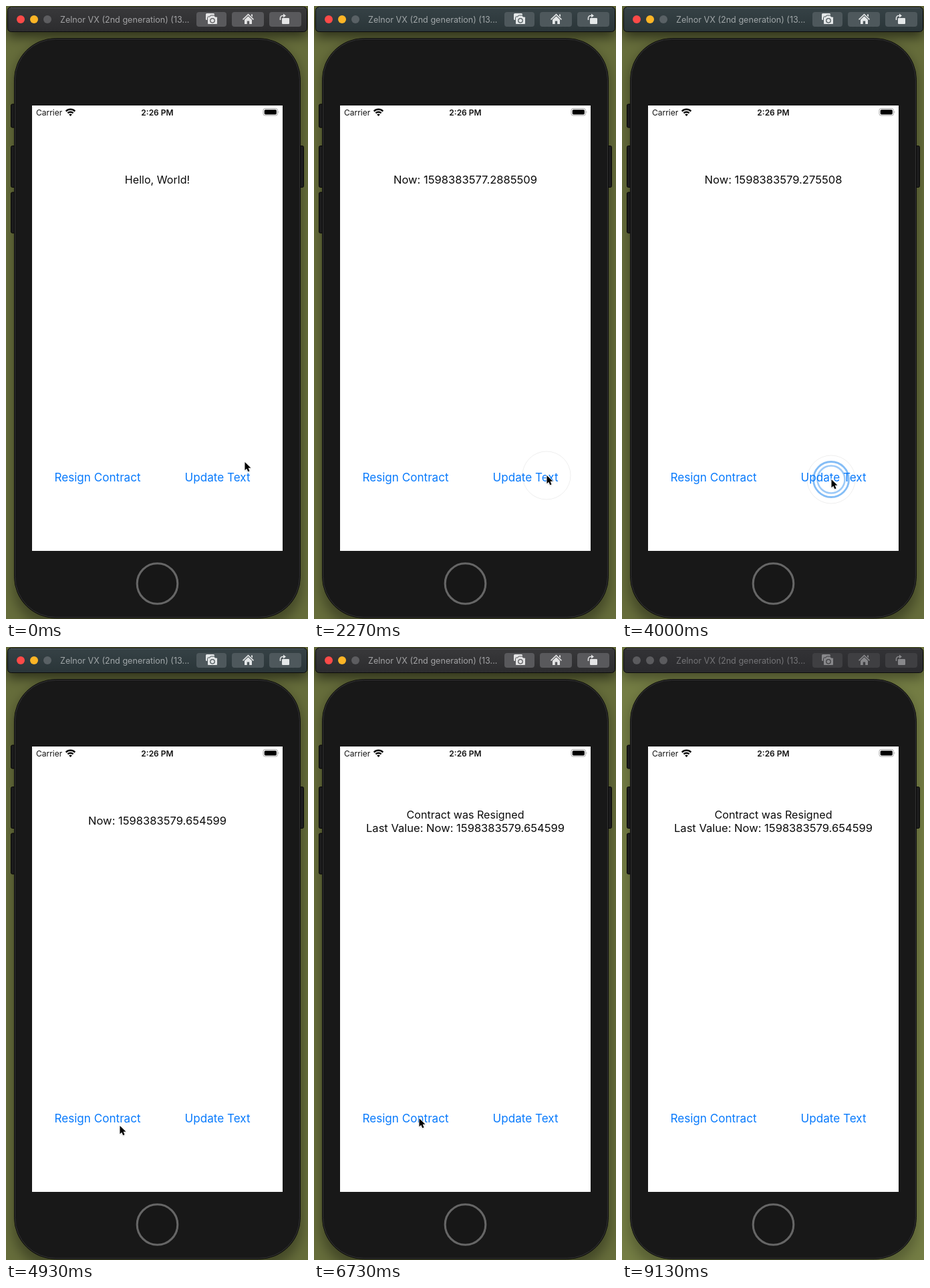
An HTML page for the animation above (9.54 s loop, 452 by 918 pixels).

```html
<!DOCTYPE html>
<html lang="en">
<head>
<meta charset="utf-8">
<title>Simulator demo</title>
<style>
  html, body { margin: 0; width: 100%; height: 100%; overflow: hidden; background: #62693a; }
  svg { display: block; width: 452px; height: 918px; }
  text { font-family: Inter, "Open Sans", sans-serif; }
  .mid { text-anchor: middle; }
  .label { font-size: 16.1px; fill: #0b0b0b; }
  .label.number { font-size: 16.55px; }
  .button { font-size: 17.1px; fill: #087afc; }
</style>
</head>
<body>
<svg viewBox="0 0 452 918" xmlns="http://www.w3.org/2000/svg">
  <defs>
    <linearGradient id="barFill" x2="0" y2="1">
      <stop id="barTop" offset="0"/><stop id="barBottom" offset="1"/>
    </linearGradient>
    <filter id="soft" x="-20%" y="-20%" width="140%" height="140%"><feGaussianBlur stdDeviation="9"/></filter>
    <filter id="small" x="-50%" y="-50%" width="200%" height="200%"><feGaussianBlur stdDeviation="1"/></filter>
  </defs>

  <rect id="desk" width="452" height="918"/>
  <g id="shadow" filter="url(#soft)">
    <rect x="2" y="8" width="449" height="38" rx="5"/>
    <rect x="11" y="56" width="431" height="874" rx="60" opacity=".6"/>
  </g>

  <!-- title bar -->
  <rect x="2.5" y="1.5" width="448" height="37" rx="5" fill="url(#barFill)" stroke="#0c0c0d"/>
  <path d="M7 2.5H446" stroke="#fff" opacity=".16"/>
  <g id="lights">
    <circle cx="22" cy="20" r="6"/><circle cx="42" cy="20" r="6"/><circle cx="62" cy="20" r="6"/>
  </g>
  <text id="title" x="81" y="24.6" font-size="12.6">Zelnor VX (2nd generation) (13...</text>
  <g id="keys">
    <rect x="285" y="9" width="45" height="22" rx="4"/>
    <rect x="338" y="9" width="48" height="22" rx="4"/>
    <rect x="394" y="9" width="48" height="22" rx="4"/>
  </g>
  <g id="icons">
    <rect x="299" y="11" width="13" height="10" rx="1.5"/>
    <path class="cut" d="M301.5 17.5a1.5 1.5 0 0 1 1.5-1.5h2l1.2-2h5.6l1.2 2h2a1.5 1.5 0 0 1 1.5 1.5v8.5a1.5 1.5 0 0 1-1.5 1.5h-12a1.5 1.5 0 0 1-1.5-1.5z"/>
    <circle class="lens" cx="309" cy="21.8" r="3.2" fill="none"/>
    <path d="M362.5 11.5l8.5 8.3-1.1 1.1-7.4-7.2-7.4 7.2-1.1-1.1zM367 12.5h2v4l-2-2z"/>
    <path d="M362.5 15.2l5.5 5.4V27h-3.8v-4.5h-3.4V27H357v-6.4z"/>
    <rect x="413" y="18" width="11" height="9" rx="1.2"/>
    <path class="turn" d="M410.5 21v-3a3.5 3.5 0 0 1 3.5-3.5h2" fill="none"/>
    <path d="M415 11.5l4 3-4 3z"/>
  </g>

  <!-- device -->
  <g fill="#1c1c1d" stroke="#050505">
    <rect x="7.5" y="147" width="9" height="35" rx="2"/>
    <rect x="7.5" y="209.5" width="9" height="62" rx="2"/>
    <rect x="7.5" y="279" width="9" height="61" rx="2"/>
    <rect x="436.5" y="209.5" width="9" height="62" rx="2"/>
  </g>
  <rect x="12.5" y="48.5" width="428" height="868" rx="62" fill="#181818" stroke="#080808"/>
  <rect x="13.5" y="49.5" width="426" height="866" rx="61" fill="none" stroke="#343435"/>
  <circle cx="226.5" cy="865" r="30.3" fill="#171717" stroke="#666" stroke-width="3.1"/>
  <rect x="39" y="149" width="375" height="667" fill="#fff"/>

  <!-- status bar -->
  <text x="45" y="163.6" font-size="12" fill="#111">Carrier</text>
  <g fill="none" stroke="#000" stroke-width="2.4">
    <path d="M89.7 157.6a9.6 9.6 0 0 1 13.6 0"/>
    <path d="M92.4 160.4a5.8 5.8 0 0 1 8.2 0"/>
  </g>
  <path d="M96.5 165l-2.3-2.4a3.2 3.2 0 0 1 4.6 0z"/>
  <text class="mid" x="226.5" y="163.6" font-size="12" font-weight="600" fill="#111">2:26 PM</text>
  <rect x="385" y="153.5" width="21.5" height="10.5" rx="2.8" fill="none" stroke="#a9a9a9"/>
  <rect x="386.7" y="155.2" width="18.2" height="7.2" rx="1.6"/>
  <path d="M407.7 157q1.6 1.7 0 3.5z" fill="#999"/>

  <!-- app -->
  <text id="line1" x="226.5"></text>
  <text id="line2" x="226.5" y="276.5"></text>
  <text id="resign" class="mid button" x="137" y="711.6">Resign Contract</text>
  <text id="update" class="mid button" x="316.5" y="711.6">Update Text</text>
  <g id="rings" fill="none"></g>
  <g id="cursor">
    <path d="M0 1V15L3.2 12 5.4 17.3 8 16.2 5.8 11H10.2Z" opacity=".4" filter="url(#small)"/>
    <path d="M0 0V14L3.2 11 5.4 16.3 8 15.2 5.8 10H10.2Z" stroke="#fff" stroke-width="1.8" paint-order="stroke"/>
  </g>
</svg>
<script>
const LOOP = 9540, STEP = 200 / 3, INACTIVE = 9060;
const el = id => document.getElementById(id);
const clamp = v => Math.max(0, Math.min(1, v));
const mix = (a, b, p) => a + (b - a) * p;
const ease = p => p * p * (3 - 2 * p);

const themes = {
  plain:    { desk: "#666d3b", shade: .57, bar: ["#39393b", "#2c2c2e"], key: "#59595c", icon: "#e4e4e5", title: "#a2a2a4", lights: ["#fc4a48", "#fdb526", "#5d5d60"] },
  tinted:   { desk: "#666d3b", shade: .57, bar: ["#364246", "#2a3538"], key: "#4e585c", icon: "#e4e7e8", title: "#a0a6a8", lights: ["#fc4a48", "#fdb526", "#596165"] },
  inactive: { desk: "#747d44", shade: .4, bar: ["#333336", "#2a2a2d"], key: "#3f3f42", icon: "#88888b", title: "#747477", lights: ["#5b5b5e", "#5b5b5e", "#5b5b5e"] }
};

// time, x, y of the pointer tip
const pointer = [
  [0, 357, 682], [70, 357, 682], [700, 348, 702], [2280, 348, 702], [2600, 305, 704],
  [3000, 305, 704], [3400, 313, 708], [4250, 313, 708], [4750, 172, 717], [4930, 170, 716],
  [5100, 159, 703], [5950, 159, 703], [6350, 157, 705], [6740, 157, 705], [7250, 152, 704],
  [7730, 152, 704], [8120, 327, 708], [8720, 327, 708], [9060, 440, 560]
];

const clicks = [
  { down: 920, up: 1040, x: 348, y: 703, on: "update" },
  { down: 1620, up: 1740, x: 348, y: 703, on: "update" },
  { down: 3600, up: 3730, x: 313, y: 709, on: "update" },
  { down: 3980, up: 4110, x: 313, y: 709, on: "update" },
  { down: 5120, up: 5240, x: 159, y: 704, on: "resign" },
  { down: 7560, up: 7690, x: 152, y: 705, on: "resign" },
  { down: 8200, up: 8330, x: 327, y: 709, on: "update" }
];

const messages = [
  [0, "Hello, World!"],
  [1040, "Now: 1598383576.588217"],
  [1740, "Now: 1598383577.2885509"],
  [3730, "Now: 1598383579.275508"],
  [4110, "Now: 1598383579.654599"],
  [5240, "Contract was Resigned", "Last Value: Now: 1598383579.654599"]
];

for (const c of clicks) {
  c.circles = [0, 1].map(() =>
    el("rings").appendChild(document.createElementNS("http://www.w3.org/2000/svg", "circle")));
  for (const ring of c.circles) setAll(ring, { cx: c.x, cy: c.y });
}

function setAll(node, attrs) {
  for (const name in attrs) node.setAttribute(name, attrs[name]);
}

function applyTheme(theme) {
  el("desk").setAttribute("fill", theme.desk);
  el("shadow").setAttribute("opacity", theme.shade);
  el("barTop").setAttribute("stop-color", theme.bar[0]);
  el("barBottom").setAttribute("stop-color", theme.bar[1]);
  el("title").setAttribute("fill", theme.title);
  el("keys").setAttribute("fill", theme.key);
  el("icons").setAttribute("fill", theme.icon);
  setAll(document.querySelector(".cut"), { stroke: theme.key, "stroke-width": 1 });
  setAll(document.querySelector(".lens"), { stroke: theme.key, "stroke-width": 1.3 });
  setAll(document.querySelector(".turn"), { stroke: theme.icon, "stroke-width": 1.6 });
  [...el("lights").children].forEach((light, i) => light.setAttribute("fill", theme.lights[i]));
}

function setLabel(node, text) {
  node.textContent = text;
  node.setAttribute("class", /\d/.test(text) ? "mid label number" : "mid label");
}

function drawPointer(t) {
  const next = pointer.findIndex(k => k[0] > t);
  const visible = next > 0 && t < INACTIVE;
  el("cursor").setAttribute("visibility", visible ? "visible" : "hidden");
  if (!visible) return;
  const [t0, x0, y0] = pointer[next - 1], [t1, x1, y1] = pointer[next];
  const p = ease((t - t0) / (t1 - t0));
  el("cursor").setAttribute("transform", `translate(${mix(x0, x1, p) + .5} ${mix(y0, y1, p) + 1}) scale(.88)`);
}

function drawClicks(t) {
  const dim = { resign: 1, update: 1 };
  for (const c of clicks) {
    const [outer, inner] = c.circles;
    const shown = t >= c.down && t < c.up + 620 && t < INACTIVE;
    const p = clamp((t - c.up) / 200);
    const faint = p === 1;
    setAll(outer, {
      visibility: shown ? "visible" : "hidden",
      r: mix(26.5, 36, p),
      stroke: faint ? "#000" : "#0b7cee",
      "stroke-width": mix(2.8, 1, p),
      opacity: faint ? .07 : mix(.5, .1, p)
    });
    setAll(inner, {
      visibility: shown && !faint ? "visible" : "hidden",
      r: mix(20.5, 32, p),
      stroke: "#0b7cee",
      "stroke-width": 2.6,
      opacity: .4 * (1 - p)
    });
    if (t > c.down + 60) dim[c.on] = mix(.3, 1, clamp((t - c.up) / 250));
  }
  for (const id in dim) el(id).setAttribute("opacity", dim[id]);
}

function render(t) {
  applyTheme(t >= INACTIVE ? themes.inactive : t >= 920 && t < 5240 ? themes.tinted : themes.plain);
  const [, first, second = ""] = messages.filter(m => m[0] <= t).pop();
  setLabel(el("line1"), first);
  setLabel(el("line2"), second);
  el("line1").setAttribute("y", second ? 256.7 : 266);
  drawClicks(t);
  drawPointer(t);
}

const start = performance.now();
function tick(now) {
  const t = Math.max(0, now - start) % LOOP;
  render(Math.floor((t + 5) / STEP) * STEP);
  requestAnimationFrame(tick);
}
render(0);
requestAnimationFrame(tick);
</script>
</body>
</html>
```
